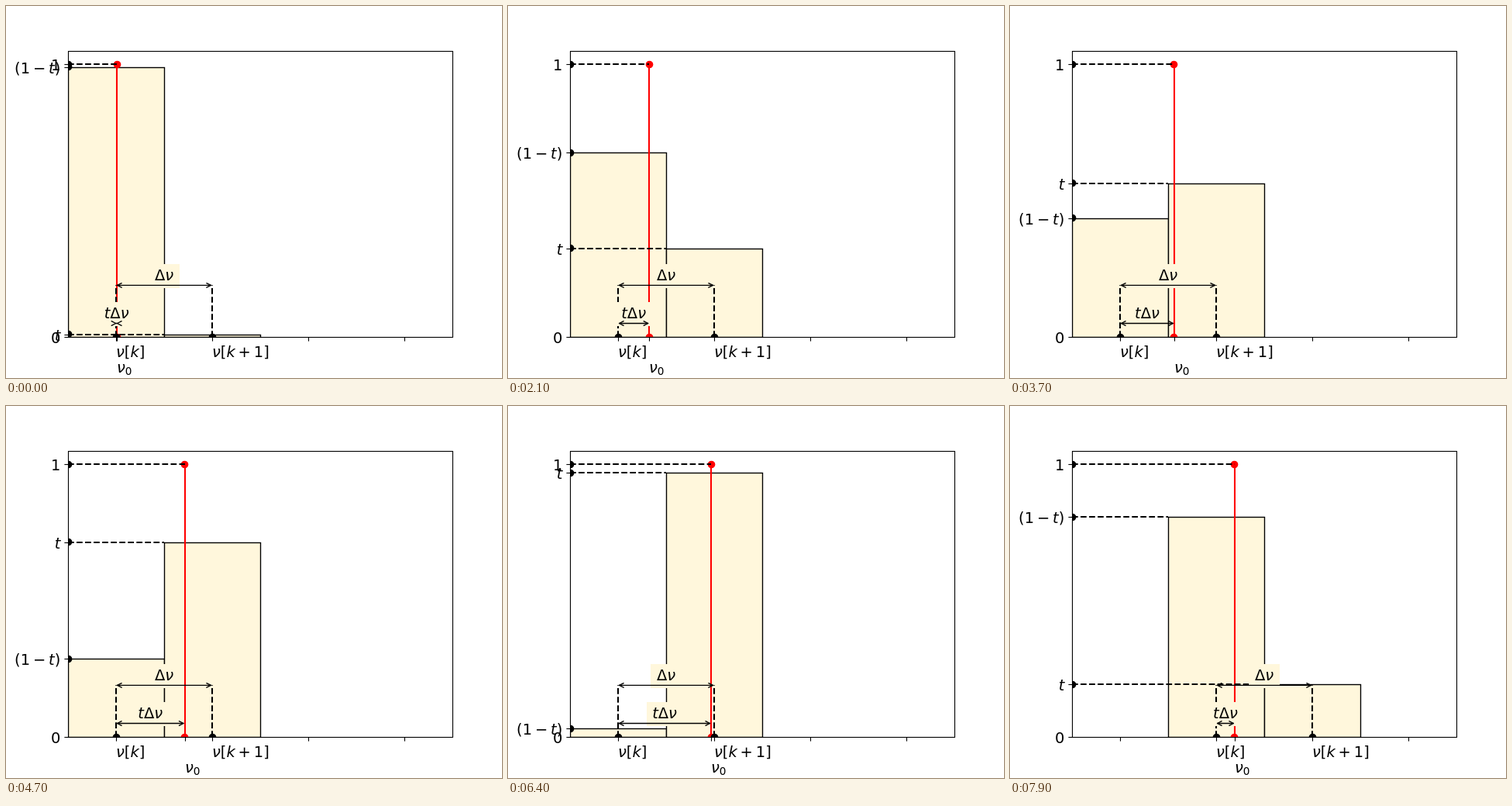
These frames come from a looping animation (640 px wide and 480 px high, 8 s). An HTML page with a canvas:

```html
<!DOCTYPE html>
<html lang="en">
<head>
<meta charset="utf-8">
<title>Linear bin sharing</title>
<style>
html, body { margin: 0; width: 100%; height: 100%; overflow: hidden; background: #fff; }
canvas { display: block; width: 640px; height: 480px; }
</style>
</head>
<body>
<canvas id="stage" width="640" height="480"></canvas>
<script>
const ctx = document.getElementById("stage").getContext("2d");

const LEFT = 80, RIGHT = 576, TOP = 57.6, BASE = 427.2;
const BIN = 124, UNIT = 352, SIZE = 19.44;
const FILL = "#fff7dc";
const THIN = 1.11, EDGE = 1.39, BOLD = 2.08;
const STEP_MS = 100, STEPS = 80;

const px = v => LEFT + BIN * v;
const py = v => BASE - UNIT * v;
const whole = v => Math.floor(v + 0.5);
const half = v => whole(v) + 0.5;

// Math labels: [text, italic, extra space on both sides, subscript]
const up = s => [s, false, 0, false];
const it = s => [s, true, 0, false];
const op = s => [s, false, 0.2 * SIZE, false];
const sub = s => [s, false, 0, true];
const DELTA = [up("Δ"), it("ν")];
const T_DELTA = [it("t"), up("Δ"), it("ν")];
const ONE_MINUS_T = [up("("), up("1"), op("−"), it("t"), up(")")];
const NU_K = [it("ν"), up("["), it("k"), up("]")];
const NU_NEXT = [it("ν"), up("["), it("k"), op("+"), up("1"), up("]")];
const NU_ZERO = [it("ν"), sub("0")];

function setFont([, italic, , small]) {
  ctx.font = `${italic ? "italic " : ""}${small ? SIZE * 0.7 : SIZE}px "DejaVu Sans", sans-serif`;
}

function widthOf(parts) {
  let w = 0;
  for (const p of parts) {
    setFont(p);
    w += ctx.measureText(p[0]).width + 2 * p[2];
  }
  return w;
}

function label(parts, x, y, align = 0) {
  x -= widthOf(parts) * align;
  ctx.fillStyle = "#000";
  for (const p of parts) {
    setFont(p);
    ctx.fillText(p[0], x + p[2], y + (p[3] ? 3 : 0));
    x += ctx.measureText(p[0]).width + 2 * p[2];
  }
}

function line(x1, y1, x2, y2, width, color = "#000", dash = []) {
  ctx.strokeStyle = color;
  ctx.lineWidth = width;
  ctx.setLineDash(dash);
  ctx.beginPath();
  ctx.moveTo(x1, y1);
  ctx.lineTo(x2, y2);
  ctx.stroke();
  ctx.setLineDash([]);
}

function dashed(x1, y1, x2, y2) {
  if (x1 === x2 && y1 === y2) return;
  line(whole(x1), whole(y1), whole(x2), whole(y2), BOLD, "#000", [7.71, 3.33]);
}

function dot(x, y, color) {
  ctx.fillStyle = color;
  ctx.beginPath();
  ctx.arc(Math.floor(x) + 0.5, Math.floor(y) + 0.5, 4.86, 0, 2 * Math.PI);
  ctx.fill();
}

function bar(i, value) {
  const x = half(px(i)), y = half(py(value)), h = half(BASE) - y;
  ctx.fillStyle = FILL;
  ctx.fillRect(x, y, BIN, h);
  ctx.strokeStyle = "#000";
  ctx.lineWidth = EDGE;
  ctx.strokeRect(x, y, BIN, h);
}

function boxed(parts, x, y) {
  const w = widthOf(parts) + 15.2;
  const left = whole(x - w / 2);
  ctx.fillStyle = FILL;
  ctx.fillRect(left, y - 21, whole(x + w / 2) - left, 31);
  label(parts, x, y, 0.5);
}

function head(tip, y, dir) {
  const x = tip + dir * 1.55, back = x + dir * 5.56;
  ctx.beginPath();
  ctx.moveTo(back, y - 2.78);
  ctx.lineTo(x, y);
  ctx.lineTo(back, y + 2.78);
  ctx.stroke();
}

function arrow(x1, x2, y) {
  ctx.lineCap = ctx.lineJoin = "round";
  line(x1 + 1.55, y, x2 - 1.55, y, EDGE);
  head(x1, y, 1);
  head(x2, y, -1);
  ctx.lineCap = "butt";
  ctx.lineJoin = "miter";
}

function yTick(value, parts) {
  const y = py(value);
  line(75.4, half(y), LEFT + 0.5, half(y), THIN);
  label(parts, 70.28, whole(y + 8), 1);
}

function xTick(x) {
  line(half(x), 427.5, half(x), 432.6, THIN);
}

function draw(step) {
  const pos = 0.01 + step * 2.98 / 199;
  const k = Math.floor(pos), t = pos - k;
  const x0 = px(k + 0.5), x1 = px(k + 1.5), xr = px(pos + 0.5);

  ctx.fillStyle = "#fff";
  ctx.fillRect(0, 0, 640, 480);

  ctx.save();
  ctx.beginPath();
  ctx.rect(LEFT, 58, RIGHT - LEFT, 370);
  ctx.clip();
  bar(k, 1 - t);
  bar(k + 1, t);

  line(whole(xr), whole(BASE), whole(xr), whole(py(1)), BOLD, "#f00");
  dot(xr, py(1), "#f00");
  dot(xr, BASE, "#f00");

  dashed(LEFT, py(1), xr, py(1));
  dashed(LEFT, py(1 - t), px(k), py(1 - t));
  dashed(LEFT, py(t), px(k + 1), py(t));
  for (const x of [x0, x1]) {
    dashed(x, BASE, x, py(0.19));
    dot(x, BASE, "#000");
  }
  for (const v of [1, 1 - t, t]) dot(LEFT, py(v), "#000");
  ctx.restore();

  for (let i = 0; i < 4; i++) xTick(px(i + 0.5));
  xTick(xr);
  yTick(0, [up("0")]);
  yTick(1, [up("1")]);
  yTick(t, [it("t")]);
  yTick(1 - t, ONE_MINUS_T);
  ctx.strokeStyle = "#000";
  ctx.lineWidth = THIN;
  ctx.strokeRect(half(LEFT), half(TOP), RIGHT - LEFT, half(BASE) - half(TOP));

  label(NU_K, x0, 453);
  label(NU_NEXT, x1, 453);
  label(NU_ZERO, whole(xr), 473);

  boxed(DELTA, (x0 + x1) / 2, 354);
  boxed(T_DELTA, (x0 + xr) / 2, 403);
  arrow(x0, x1, 360.4);
  arrow(x0, xr, 409.5);
}

function tick() {
  draw(Math.floor(performance.now() / STEP_MS) % STEPS);
  requestAnimationFrame(tick);
}
tick();
</script>
</body>
</html>
```
